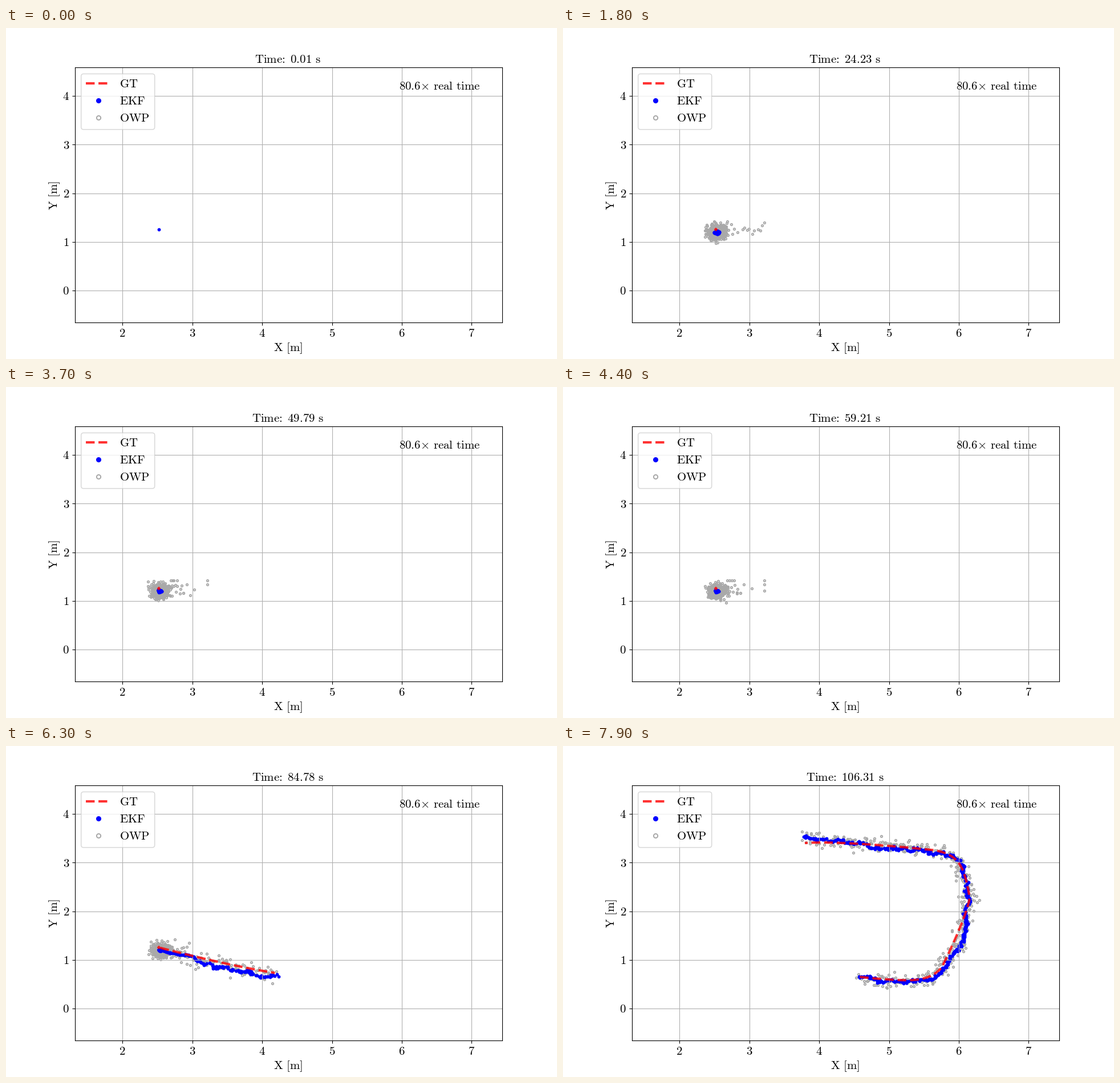
Write a matplotlib script that moves like this. It is 966x580 px and loops after 8000 ms.

```python
import numpy as np
import matplotlib.pyplot as plt
from matplotlib.animation import FuncAnimation
from matplotlib.patches import FancyBboxPatch
from matplotlib.transforms import Affine2D

W, H, DPI = 966, 580, 100
FRAMES, INTERVAL = 80, 100
RATE = 32          # samples per animation step
WINDOW = 15        # visible history, in steps
STEP = 1.3456
SX, SY = 122.45, 85.25   # pixels per metre
START, CORNER, END = 58.6, 71, 79
LEG = 60           # curve points per path leg

plt.rcParams["mathtext.fontset"] = "cm"
rng = np.random.default_rng(12)

# Cubic Bezier chain of the true path, stage pixels, y down
ROUTE = [(268, 353), (380, 382), (500, 409),
         (605, 410.5), (635, 410), (652, 402),
         (664, 388), (674, 368), (708, 298),
         (713, 266), (704, 215), (697, 190),
         (650, 182.5), (600, 177), (480, 166), (424, 170)]


def bezier_chain(keys):
    keys = np.array(keys, float)
    t = np.linspace(0, 1, LEG, endpoint=False)[:, None]
    legs = [(1 - t) ** 3 * a + 3 * t * (1 - t) ** 2 * b + 3 * t ** 2 * (1 - t) * c + t ** 3 * d
            for a, b, c, d in (keys[i:i + 4] for i in range(0, len(keys) - 1, 3))]
    return np.vstack(legs + [keys[-1:]])


def wander(n, keep):
    """Correlated noise of unit variance."""
    out = np.zeros((n, 2))
    kicks = rng.normal(size=(n, 2)) * np.sqrt(1 - keep ** 2)
    for k in range(1, n):
        out[k] = keep * out[k - 1] + kicks[k]
    return out


def simulate():
    n = END * RATE + 1
    step = np.arange(n)[:, None] / RATE
    moving = step > START
    ramp = np.clip((step - START) / 2, 0, 1)

    def bump(centre, width):
        return np.exp(-((step - centre) / width) ** 2)

    # Constant-speed travel along the route after standing still
    curve = bezier_chain(ROUTE)
    lengths = np.hypot(*(np.diff(curve, axis=0) / (SX, SY)).T)
    knots = np.concatenate([[0], np.cumsum(lengths)])
    s = np.interp(step[:, 0], [START, CORNER, END], [0, knots[3 * LEG], knots[-1]])
    route = np.column_stack([np.interp(s, knots, c) for c in curve.T])
    truth = route + rng.normal(0, 0.12, (n, 2)) * ~moving

    # Filter bias: settles at once, fades on the way, swings out in the bends
    bias = (1 - np.exp(-step / 0.5)) * np.exp(-np.maximum(step - 61, 0) / 4) * (2, 4.5)
    bias = bias + bump(68.9, 0.9) * (9, 3) + bump(70.5, 0.4) * (-5, 0) + bump(79, 0.6) * (0, -11)
    centre = route + bias

    calm = (0.7 + 1.5 * np.exp(-step / 12)) * (1.2, 0.7)
    estimate = centre + wander(n, 0.94) * (calm + ramp * (2.2, 2.4))
    estimate[1:] += (wander(n, 0.5) * ramp * 1.3)[1:]

    # Measurements: round cloud with a tail to the right while standing
    raw = centre + rng.normal(size=(n, 2)) * (7.6, 6.1)
    tail = (rng.random((n, 1)) < 0.08) & ~moving
    skew = np.column_stack([rng.exponential(23, n), rng.normal(-6, 3, n)])
    raw = np.where(tail, raw + skew, raw)
    raw = np.where(moving, raw, np.clip(raw, (249, 339), (353, 378)))
    return truth, estimate, raw


def tex(text):
    words = "\\hspace{0.38}".join(r"\text{%s}" % w for w in text.split())
    return "$" + words.replace(":}\\hspace{0.38}", ":}\\hspace{0.51}") + "$"


fig = plt.figure(figsize=(W / DPI, H / DPI), dpi=DPI, facecolor="white")
ax = fig.add_axes([120.92 / W, 64.1 / H, 748.65 / W, 446.6 / H])
ax.set(xlim=(1.32, 7.434), ylim=(-0.653, 4.585))
ax.set_xticks(range(2, 8), labels=[""] * 6)
ax.set_yticks(range(5), labels=[""] * 5)
ax.grid(True)
stage = Affine2D().scale(1 / W, -1 / H).translate(0, 1) + fig.transFigure


def label(x, y, text, ha="center", va="baseline", **kw):
    return ax.text(x, y, text, ha=ha, va=va, size=15, transform=stage, **kw)


def series(x=(), y=(), **kw):
    return ax.plot(x, y, transform=stage, scalex=False, scaley=False, **kw)[0]


RING = dict(ls="", marker="o", mfc="none", mec="darkgray")
DOT = dict(ls="", marker="o", color="blue")
DASH = dict(ls="--", lw=3, color="red", alpha=0.8)

for v in range(2, 8):
    label(204 + (v - 2) * SX, 540.6, tex(str(v)))
for v in range(5):
    label(111, 467.3 - v * SY, tex(str(v)), ha="right")
label(495, 565.8, tex("X [m]"))
label(97, 293, tex("Y [m]"), ha="right", va="center", rotation=90)
label(832, 108, r"$\text{80.6}{\times}\hspace{0.38}\text{real}\hspace{0.38}\text{time}$",
      ha="right")
title = label(494.3, 61.3, "")

# Legend
ax.add_patch(FancyBboxPatch((131.7, 80.4), 129, 97.4, transform=stage, zorder=5,
                            boxstyle="round,pad=0,rounding_size=4.2",
                            fc="white", ec="0.8", lw=1, alpha=0.8))
series([140, 181.7], [97, 97], zorder=6, **DASH)
series([161.5], [127], ms=5.2, mew=1.3, zorder=6, **DOT)
series([161.5], [157], ms=5.2, mew=1.4, zorder=6, **RING)
for row, name in enumerate(["GT", "EKF", "OWP"]):
    label(199, 104.3 + 29.8 * row, tex(name), ha="left", zorder=6)

truth, estimate, raw = simulate()
rings = series(ms=2.5, mew=1.3, zorder=1, **RING)
dots = series(ms=3, mew=1.2, zorder=1.1, **DOT)
path = series(zorder=2, **DASH)


def update(i):
    hi = i * RATE + 1
    lo = max(0, hi - WINDOW * RATE)
    rings.set_data(*raw[max(1, lo):hi].T)
    dots.set_data(*estimate[lo:hi].T)
    path.set_data(*truth[lo:hi].T)
    title.set_text(tex(f"Time: {0.0055 + STEP * i:.2f} s"))
    return rings, dots, path, title


anim = FuncAnimation(fig, update, frames=FRAMES, interval=INTERVAL,
                     init_func=lambda: update(0), repeat=True, repeat_delay=0)
plt.show()
```
